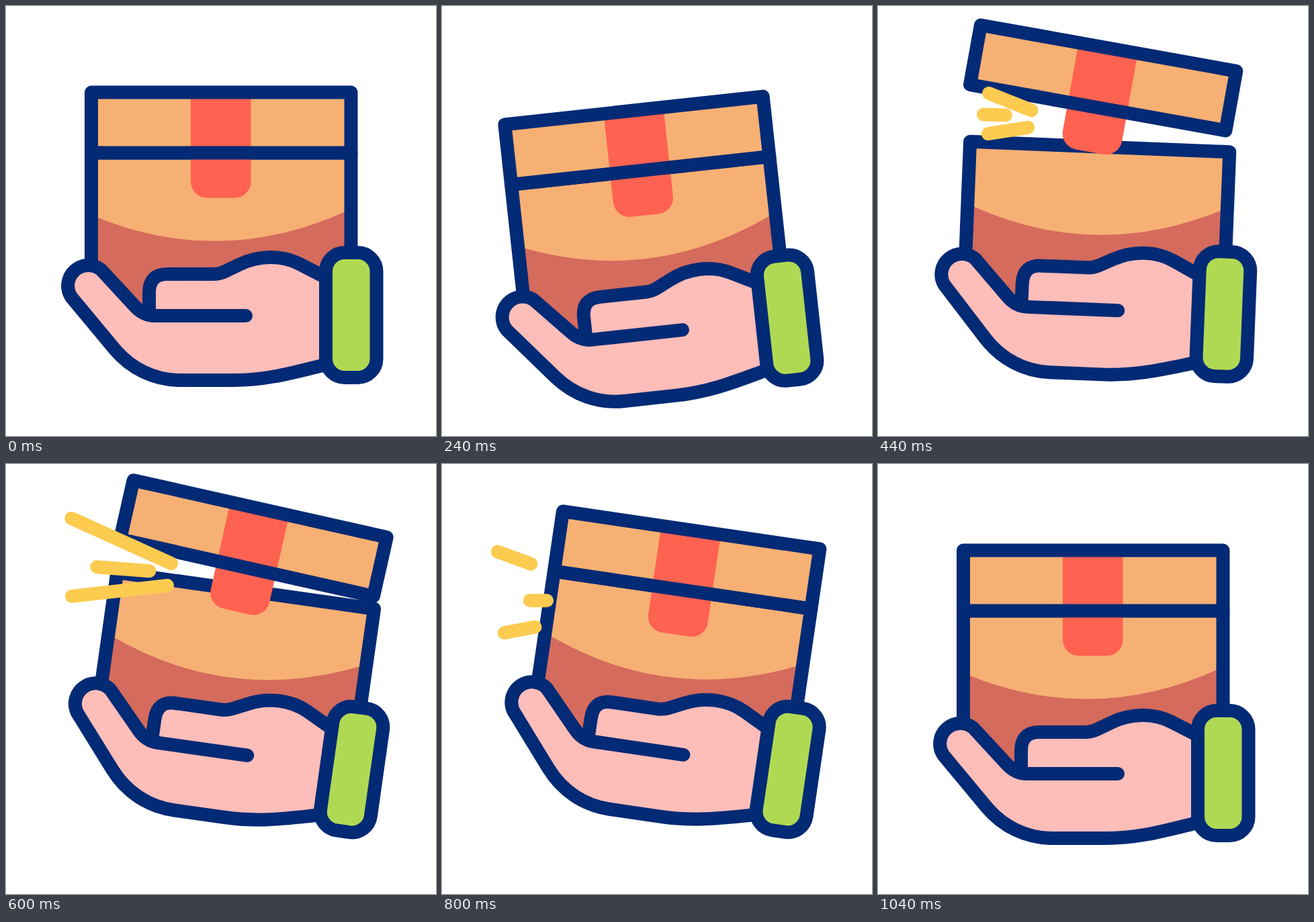
An HTML page for the animation above (2 s loop, 640x640 px).

```html
<!DOCTYPE html>
<html lang="en">
<head>
<meta charset="utf-8">
<title>Parcel in hand</title>
<style>
  html, body { margin: 0; width: 100%; height: 100%; overflow: hidden; background: #fff; }
  svg { display: block; width: 100%; height: 100%; }
  .ink { fill: none; stroke: #032a75; stroke-width: 20; stroke-linecap: round; stroke-linejoin: round; }
  .card { fill: #f7b073; }
  .shade { fill: #d46b5d; }
  .tape { fill: #ff6250; }
  .skin { fill: #fdbdb9; }
  .cuff { fill: #b0d953; }
  #sparks { stroke: #fdcb50; stroke-width: 20; stroke-linecap: round; }
</style>
</head>
<body>
<svg viewBox="0 0 640 640">
  <g id="scene">
    <path class="card" d="M127 218.5H513.5V450H127Z"/>
    <path class="shade" d="M127 311Q320.5 393 513.5 302V450H127Z"/>
    <path class="ink" d="M127 400V218.5H513.5V400"/>

    <g id="lid">
      <path class="card" d="M127 128.5H513.5V218.5H127Z"/>
      <path class="tape" d="M275 128.5H364.5V261.5A24 24 0 0 1 340.5 285.5H299A24 24 0 0 1 275 261.5Z"/>
      <path class="ink" d="M127 128.5H513.5V218.5H127Z"/>
    </g>

    <!-- palm, fingers, thumb with underside -->
    <path class="skin" d="M213 461L300 420L476 404V534L337 557Z"/>
    <path class="ink skin" d="M213 461V427Q213 399 240 399H308Q318 399 326 395L347 385C375 371 410 370 437 384L476 404"/>
    <path class="ink skin" d="M357 461H222C208 461 199 455 191 446L141.5 392.5A30.5 30.5 0 0 0 97 433L161 510C186 540 221 557 260 557H337C390 557 430 545 475 534"/>
    <rect class="ink cuff" x="476" y="367" width="75.5" height="186" rx="28"/>

    <g id="sparks"></g>
  </g>
</svg>
<script>
const LOOP = 2000, STEP = 40;
const WRIST = "552 463", LID_CENTER = "320 180";
const LID_TURN = .137; // degrees per pixel of lift
const $ = id => document.getElementById(id);

// Progress from 0 to 1 between two times
const ramp = (t, from, to) => Math.min(1, Math.max(0, (t - from) / (to - from)));
const easeOut = u => 1 - (1 - u) ** 1.25;

// Dip under the weight, swing up, settle back
const tilt = t =>
  -6.2 * ramp(t, 0, 240) + 17.3 * easeOut(ramp(t, 240, 720)) - 11.1 * ramp(t, 720, 1040);
const lift = t => 63.5 * (ramp(t, 240, 460) - ramp(t, 460, 760));
const head = t => ramp(t, 340, 615);
const tail = t => ramp(t, 575, 888);

const sparks = [
  { start: [224, 240], end: [39.5, 202] },
  { start: [187, 254], end: [97.5, 267] },
  { start: [223, 266], end: [67, 320] }
];
for (const spark of sparks) {
  spark.line = document.createElementNS("http://www.w3.org/2000/svg", "line");
  $("sparks").append(spark.line);
}

function place({ line, start, end }, n, k) {
  ["x", "y"].forEach((axis, i) => line.setAttribute(axis + n, start[i] + (end[i] - start[i]) * k));
}

function draw(t) {
  $("scene").setAttribute("transform", `rotate(${tilt(t)} ${WRIST})`);

  const up = lift(t);
  const lidPose = `translate(0 ${-up}) rotate(${up * LID_TURN} ${LID_CENTER})`;
  $("lid").setAttribute("transform", lidPose);
  $("sparks").setAttribute("transform", lidPose);

  const a = tail(t), b = head(t);
  $("sparks").setAttribute("visibility", b > a ? "visible" : "hidden");
  for (const spark of sparks) {
    place(spark, 1, a);
    place(spark, 2, b);
  }
}

function tick() {
  const t = performance.now() % LOOP;
  draw(Math.floor(t / STEP) * STEP);
  requestAnimationFrame(tick);
}
draw(0);
requestAnimationFrame(tick);
</script>
</body>
</html>
```
